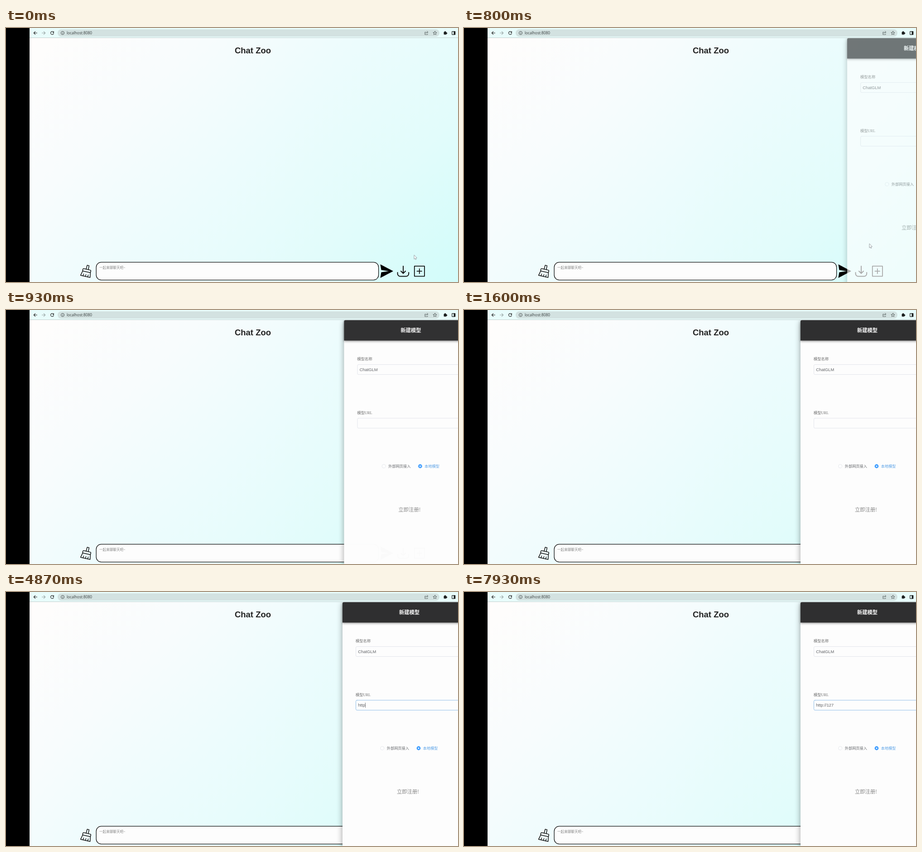
These frames come from a looping animation (998x561 px, 8 s). An HTML page with a canvas:

```html
<!DOCTYPE html>
<html lang="zh">
<head>
<meta charset="utf-8">
<title>Chat Zoo</title>
<style>
html, body { margin: 0; width: 100%; height: 100%; overflow: hidden; background: #000; }
canvas { display: block; width: 998px; height: 561px; }
</style>
</head>
<body>
<canvas id="stage"></canvas>
<script>
const W = 998, H = 561, LOOP = 8000;
const SANS = '"Liberation Sans", Arial, sans-serif';
const CJK = '"Noto Sans CJK SC", "Noto Sans CJK", sans-serif';
const MIXED = '"Liberation Serif", ' + CJK;
const PANEL = { x: 743, w: 294, pad: 40, start: 699, time: 270 };
const FOCUS = 2400;
// Each entry: time of a key press and the field value after it.
const KEYS = [
  [FOCUS, ''], [3700, 'h'], [3850, 'ht'], [4020, 'htt'], [4450, 'http'],
  [5420, 'http:'], [5700, 'http:/'], [6150, 'http://'], [6230, 'http://l'],
  [6800, 'http://'], [7050, 'http://1'], [7200, 'http://12'], [7340, 'http://127']
];

const scale = Math.max(1, window.devicePixelRatio || 1);

function surface(canvas, w, h) {
  canvas.width = Math.round(w * scale);
  canvas.height = Math.round(h * scale);
  const g = canvas.getContext('2d');
  g.scale(scale, scale);
  g.lineCap = g.lineJoin = 'round';
  return g;
}

const page = document.createElement('canvas');
const drawer = document.createElement('canvas');
const drawerW = W - PANEL.x + PANEL.pad;
const ctx = surface(document.getElementById('stage'), W, H);
const pg = surface(page, W, H);
const dg = surface(drawer, drawerW, H);

function text(g, str, x, y, font, color, align = 'left') {
  g.font = font;
  g.fillStyle = color;
  g.textAlign = align;
  g.fillText(str, x, y);
}

function line(g, points, color, width, closed) {
  g.beginPath();
  points.forEach(([x, y]) => g.lineTo(x, y));
  if (closed) g.closePath();
  g.strokeStyle = color;
  g.lineWidth = width;
  g.stroke();
}

function shape(g, points, color) {
  g.beginPath();
  points.forEach(([x, y]) => g.lineTo(x, y));
  g.closePath();
  g.fillStyle = color;
  g.fill();
}

function box(g, x, y, w, h, r, fill, stroke, width = 1) {
  g.beginPath();
  g.roundRect(x, y, w, h, r);
  if (fill) { g.fillStyle = fill; g.fill(); }
  if (stroke) { g.strokeStyle = stroke; g.lineWidth = width; g.stroke(); }
}

function arc(g, x, y, r, fill, stroke, width = 1, from = 0, to = 2 * Math.PI) {
  g.beginPath();
  g.arc(x, y, r, from, to);
  if (fill) { g.fillStyle = fill; g.fill(); }
  if (stroke) { g.strokeStyle = stroke; g.lineWidth = width; g.stroke(); }
}

function arrow(g, x, y, dir, color) {
  line(g, [[x - 3.5, y], [x + 3.5, y]], color, 1.2);
  line(g, [[x + dir * 0.4, y - 3.2], [x + dir * 3.6, y], [x + dir * 0.4, y + 3.2]], color, 1.2);
}

function star(g, x, y, r) {
  const points = [];
  for (let i = 0; i < 10; i++) {
    const a = -Math.PI / 2 + i * Math.PI / 5, d = i % 2 ? r * 0.45 : r;
    points.push([x + d * Math.cos(a), y + d * Math.sin(a)]);
  }
  line(g, points, '#4a5252', 0.9, true);
}

function toolbar(g) {
  g.fillStyle = '#e8fcfb';
  g.fillRect(52, 0, W - 52, 21);
  g.fillStyle = '#c3d0d0';
  g.fillRect(52, 21, W - 52, 1);
  box(g, 114, 3, 843, 16, 8, '#d3e2e1');
  arrow(g, 65, 11, -1, '#222');
  arrow(g, 83, 11, 1, '#98a3a3');
  arc(g, 102, 11, 3.4, null, '#222', 1.2, 0.3, 5.4);
  shape(g, [[106, 7], [106, 10.6], [102.4, 10.6]], '#222');
  arc(g, 125, 11, 3.6, null, '#414848', 0.9);
  line(g, [[125, 10.8], [125, 12.8]], '#414848', 0.9);
  line(g, [[125, 9.1], [125, 9.2]], '#414848', 0.9);
  text(g, 'localhost:8080', 134, 14, '8.3px "Open Sans", sans-serif', '#353b3b');
  line(g, [[927, 9], [924.8, 9], [924.8, 14.6], [931, 14.6], [931, 13]], '#5a6464', 0.9);
  line(g, [[926.6, 12.4], [927.6, 10], [931.4, 9.2]], '#5a6464', 0.9);
  line(g, [[929.6, 7], [932, 9.2], [929.6, 11.2]], '#5a6464', 0.9);
  star(g, 947, 11.2, 4.3);
  box(g, 966.6, 8.6, 6, 6, 1, '#1c1f1f');
  arc(g, 969.6, 8.4, 1.5, '#1c1f1f');
  arc(g, 972.8, 11.6, 1.5, '#1c1f1f');
  box(g, 984.8, 7.6, 7, 7, 0.6, null, '#1c1f1f', 1.2);
  g.fillRect(988.6, 7.6, 3.2, 7);
}

function broom(g) {
  g.save();
  g.translate(178, 537);
  g.rotate(0.22);
  line(g, [[-2, -4], [-1.6, -13], [2.6, -13], [3, -4]], '#111', 1.5);
  box(g, -9, -4, 18, 5.5, 2, null, '#111', 1.5);
  line(g, [[-8.5, 1.5], [-11, 12], [10.5, 12], [9, 1.5]], '#111', 1.5);
  for (const x of [-5, 0.3, 5.4]) line(g, [[x - 0.5, 12], [x, 7.5]], '#111', 1.4);
  g.restore();
}

function drawPage(g) {
  g.fillStyle = '#000';
  g.fillRect(0, 0, 52, H);
  const bg = g.createLinearGradient(154, -80, 896, 662);
  bg.addColorStop(0, '#fffdfc');
  bg.addColorStop(0.25, '#f8fcfd');
  bg.addColorStop(0.5, '#ecfcfd');
  bg.addColorStop(0.75, '#e2fcfb');
  bg.addColorStop(1, '#d2fcfa');
  g.fillStyle = bg;
  g.fillRect(52, 22, W - 52, H - 22);
  toolbar(g);
  text(g, 'Chat Zoo', 545, 55.5, 'bold 18.5px ' + SANS, '#222', 'center');

  broom(g);
  box(g, 199.2, 517.4, 623.4, 39.2, 11, '#fdfdfd', '#111', 1.3);
  text(g, '一起来聊聊天吧~', 206, 532, '7.6px ' + CJK, '#858585');
  line(g, [[818, 555], [821, 552]], '#999', 0.6);
  shape(g, [[826.5, 522], [855, 537], [826.5, 552], [828.5, 539.4], [845, 537], [828.5, 534.6]], '#000');
  line(g, [[877, 526], [877, 541]], '#111', 2);
  line(g, [[872, 537], [877, 542], [882, 537]], '#111', 2);
  g.beginPath();
  g.moveTo(864.6, 540);
  g.arcTo(864.6, 548.6, 871, 548.6, 6);
  g.arcTo(889.2, 548.6, 889.2, 540, 6);
  g.lineTo(889.2, 540);
  g.stroke();
  box(g, 901.8, 525.8, 22.2, 22.6, 0.5, null, '#111', 1.8);
  line(g, [[907.5, 537.2], [918, 537.2]], '#111', 1.8);
  line(g, [[912.8, 532], [912.8, 542.4]], '#111', 1.8);
}

function shadow(g, color, blur, dy, paint) {
  g.save();
  g.shadowColor = color;
  g.shadowBlur = blur * scale;
  g.shadowOffsetY = dy * scale;
  paint();
  g.restore();
}

function field(g, y, border) {
  box(g, 29.5, y + 0.5, 236, 22, 2.5, '#fdfdfd', border);
}

function mix(a, b, k) {
  return 'rgb(' + a.map((v, i) => Math.round(v + (b[i] - v) * k)).join(',') + ')';
}

function drawDrawer(g, t) {
  g.clearRect(0, 0, drawerW, H);
  g.save();
  g.translate(PANEL.pad, 0);
  shadow(g, 'rgba(0,0,0,.38)', 14, 3, () => box(g, 0, 22.5, PANEL.w, H, 3, '#fdfdfd'));
  shadow(g, 'rgba(0,0,0,.45)', 5, 1.5, () => box(g, 0, 22.5, PANEL.w, 45, [3, 3, 0, 0], '#2f2f30'));
  text(g, '新建模型', 147.5, 49.3, 'bold 11.3px ' + CJK, '#fff', 'center');

  text(g, '模型名称', 29, 111.4, '8.3px ' + MIXED, '#6b6b6b');
  field(g, 120, '#e3e5ec');
  text(g, 'ChatGLM', 34.3, 135, '9.33px ' + SANS, '#606266');

  text(g, '模型URL', 29, 229.8, '8.3px ' + MIXED, '#6b6b6b');
  const glow = Math.min(1, Math.max(0, (t - FOCUS) / 200));
  field(g, 238.5, mix([227, 229, 236], [143, 190, 232], glow));
  const key = KEYS.filter(k => k[0] <= t).pop();
  if (key) {
    const [at, value] = key;
    text(g, value, 34.3, 253.2, '9.33px ' + SANS, '#606266');
    if ((t - at) % 1060 < 530) {
      g.fillRect(34.3 + g.measureText(value).width, 244.5, 0.9, 11);
    }
  }

  arc(g, 87.8, 345, 4, '#fff', '#dfe2e8', 0.8);
  text(g, '外部网页接入', 97.8, 347.9, '8.2px ' + CJK, '#66686c');
  arc(g, 168, 345, 4.4, '#409eff');
  arc(g, 168, 345, 1.5, '#fff');
  text(g, '本地模型', 177.8, 347.9, '8.2px ' + CJK, '#559fe6');
  text(g, '立即注册!', 120, 444.6, '11.3px ' + CJK, '#858585');
  g.restore();
}

// CSS "ease": cubic-bezier(.25, .1, .25, 1)
function ease(x) {
  if (x <= 0) return 0;
  if (x >= 1) return 1;
  const curve = (a, b, s) => 3 * a * s * (1 - s) ** 2 + 3 * b * s * s * (1 - s) + s ** 3;
  let lo = 0, hi = 1;
  for (let i = 0; i < 24; i++) {
    const mid = (lo + hi) / 2;
    if (curve(0.25, 0.25, mid) < x) lo = mid; else hi = mid;
  }
  return curve(0.1, 1, lo);
}

function pointer(g, t) {
  if (t > 880) return;
  const smooth = (a, b) => {
    const k = Math.min(1, Math.max(0, (t - a) / (b - a)));
    return k * k * (3 - 2 * k);
  };
  const down = smooth(70, 430), up = smooth(620, 800);
  g.save();
  g.translate(901 + 10 * down - 16 * up, 501.5 + 33 * down - 58 * up);
  const tip = [[0, 0], [0, 9], [2, 7.3], [3.4, 10.2], [4.8, 9.5], [3.5, 6.7], [6, 6.5]];
  shape(g, tip, '#fbfdfd');
  line(g, tip, '#858b90', 0.8, true);
  g.restore();
}

function draw(t) {
  ctx.drawImage(page, 0, 0, W, H);
  const k = ease((t - PANEL.start) / PANEL.time);
  if (k > 0) {
    drawDrawer(dg, t);
    ctx.save();
    ctx.beginPath();
    ctx.rect(52, 22, W - 52, H - 22);
    ctx.clip();
    ctx.globalAlpha = k;
    ctx.drawImage(drawer, PANEL.x - PANEL.pad + PANEL.w * (1 - k), 0, drawerW, H);
    ctx.restore();
  }
  pointer(ctx, t);
}

drawPage(pg);
const begin = performance.now();
function tick() {
  draw((performance.now() - begin) % LOOP);
  requestAnimationFrame(tick);
}
tick();
</script>
</body>
</html>
```
